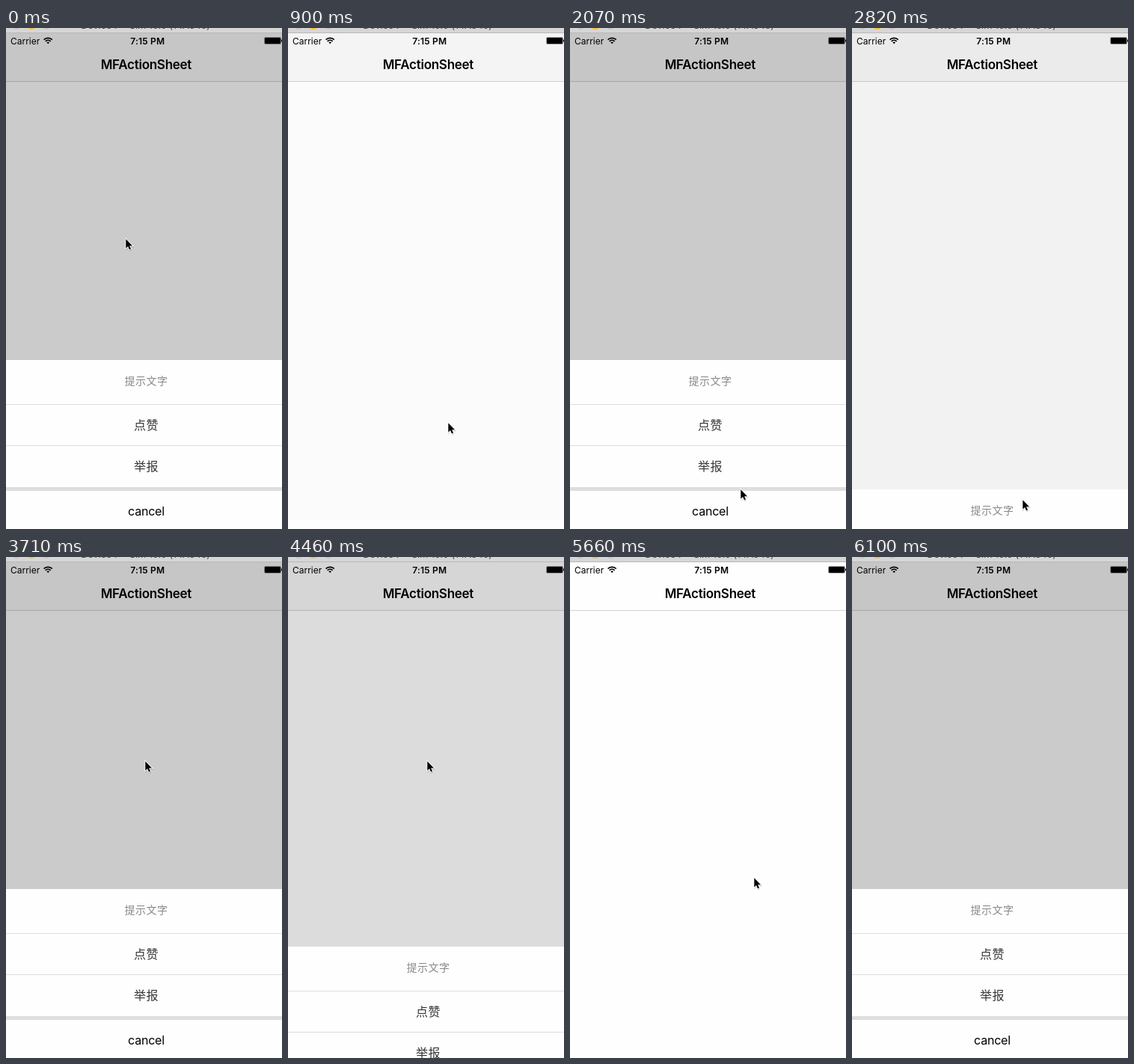
An HTML page that plays this animation: 369 px wide and 670 px high, repeating every 6340 ms.

```html
<!DOCTYPE html>
<html lang="zh-CN">
<head>
<meta charset="utf-8">
<title>Action sheet</title>
<style>
html, body { margin: 0; width: 100%; height: 100%; overflow: hidden; background: #fff; }
svg { display: block; font-family: Inter, "Noto Sans CJK SC", "Noto Sans CJK JP", "Noto Sans CJK", sans-serif; }
.mid { text-anchor: middle; }
.row { font-size: 16px; letter-spacing: .6px; fill: #333; }
</style>
</head>
<body>
<svg width="369" height="670" viewBox="0 0 369 670">
  <rect width="369" height="670" fill="#fefefe"/>
  <rect id="nav" y="7" width="369" height="64"/>
  <rect y="71" width="369" height="1" fill="#d2d2d2"/>

  <!-- window title bar -->
  <rect width="369" height="6" fill="#d6d6d6"/>
  <rect y="6" width="369" height="1" fill="#b8b8b8"/>
  <circle cx="14" cy="-4" r="6" fill="#c6c6c6"/>
  <circle cx="34" cy="-4" r="6" fill="#fdbd2e"/>
  <circle cx="54" cy="-4" r="6" fill="#c6c6c6"/>
  <text class="mid" x="186.5" y="1" font-size="13" letter-spacing="-.2" fill="#444">Device 7 – Sim 10.0 (14A345)</text>

  <rect id="dim" y="7" width="369" height="663"/>

  <!-- status and navigation bars -->
  <text x="6" y="21.5" font-size="12">Carrier</text>
  <g fill="none" stroke="#000" stroke-width="1.7">
    <path d="M50.6 15.6a8 8 0 0 1 11.2 0M52.7 17.8a5 5 0 0 1 7 0"/>
    <path d="M56.2 21.2l-1.8-2a2.7 2.7 0 0 1 3.6 0z" fill="#000" stroke="none"/>
  </g>
  <text class="mid" x="189.2" y="21.5" font-size="12" font-weight="600" letter-spacing=".2">7:15 PM</text>
  <rect x="345.5" y="12.5" width="22" height="9" rx="1.5" fill="none" stroke="#000" stroke-opacity=".35"/>
  <rect x="346" y="13" width="21" height="8" rx="1"/>
  <rect x="368" y="15.5" width="1" height="3"/>
  <text class="mid" x="187.4" y="55" font-size="17" font-weight="600" letter-spacing="-.27">MFActionSheet</text>

  <g id="sheet">
    <rect width="369" height="228" fill="#fefefe"/>
    <text class="mid" x="187.4" y="32.7" font-size="14" letter-spacing=".5" fill="#888">提示文字</text>
    <rect y="59" width="369" height="1" fill="#dedede"/>
    <text class="mid row" x="187.6" y="93">点赞</text>
    <rect y="114" width="369" height="1" fill="#dedede"/>
    <text class="mid row" x="187.6" y="148">举报</text>
    <rect y="170" width="369" height="5" fill="#dedede"/>
    <text class="mid" x="187.5" y="207.5" font-size="16" letter-spacing="-.2">cancel</text>
  </g>

  <g id="cursor">
    <g transform="translate(.3 .3) scale(.85)" stroke-width="2" paint-order="stroke">
      <path id="arrow" d="M0 0v14.4l3.3-3.1 2.2 5.1 2.4-1-2.2-5h4.6z" stroke="#000" opacity=".15" transform="translate(.5 1.5)"/>
      <path d="M0 0v14.4l3.3-3.1 2.2 5.1 2.4-1-2.2-5h4.6z" stroke="#fff"/>
    </g>
  </g>
</svg>
<script>
const $ = id => document.getElementById(id);
const LOOP = 6340, TICK = 150, SLIDE = 180, SHEET_H = 228, BOTTOM = 672;

// The screen refreshes once per tick, counted afresh from each of these times
const ticksFrom = [0, 1770, 3710, 6100];

// The sheet closes and opens in turn
const toggles = [747, 1740, 2698, 3492, 4390, 5730];

// Each pointer move slows down towards its goal
const home = { x: 160, y: 282 };
const moves = [
  { at: 0, ms: 600, x: 214, y: 528 },
  { at: 900, ms: 600, x: 241, y: 262 },
  { at: 1770, ms: 450, x: 228, y: 631 },
  { at: 2820, ms: 600, x: 186, y: 273 },
  { at: 4460, ms: 600, x: 271, y: 536 },
  { at: 5360, ms: 450, x: 245, y: 425 },
  { at: 5810, ms: 290, x: 390, y: 400 }
];

const clamp = u => Math.max(0, Math.min(1, u));
const easeInOut = u => u * u * (3 - 2 * u);
const easeOut = u => 1 - (1 - u) ** 3;

function snap(t) {
  const start = ticksFrom.findLast(s => s <= t);
  return start + Math.floor((t - start) / TICK) * TICK;
}

function openness(t) {
  return toggles.reduce((p, start, i) =>
    p + (i % 2 ? 1 : -1) * easeInOut(clamp((t - start) / SLIDE)), 1);
}

function pointer(t) {
  return moves.reduce((p, m) => {
    const u = easeOut(clamp((t - m.at) / m.ms));
    return { x: p.x + (m.x - p.x) * u, y: p.y + (m.y - p.y) * u };
  }, home);
}

function draw(now) {
  const t = snap(now % LOOP);
  const p = openness(t), { x, y } = pointer(t);
  $("dim").setAttribute("opacity", p * .2);
  $("nav").setAttribute("fill", p ? "#f7f7f7" : "#fefefe");
  $("sheet").setAttribute("transform", `translate(0 ${BOTTOM - Math.floor(SHEET_H * p)})`);
  $("cursor").setAttribute("transform", `translate(${Math.round(x)} ${Math.round(y)})`);
}

const began = performance.now();
function frame() {
  draw(performance.now() - began);
  requestAnimationFrame(frame);
}
frame();
</script>
</body>
</html>
```
